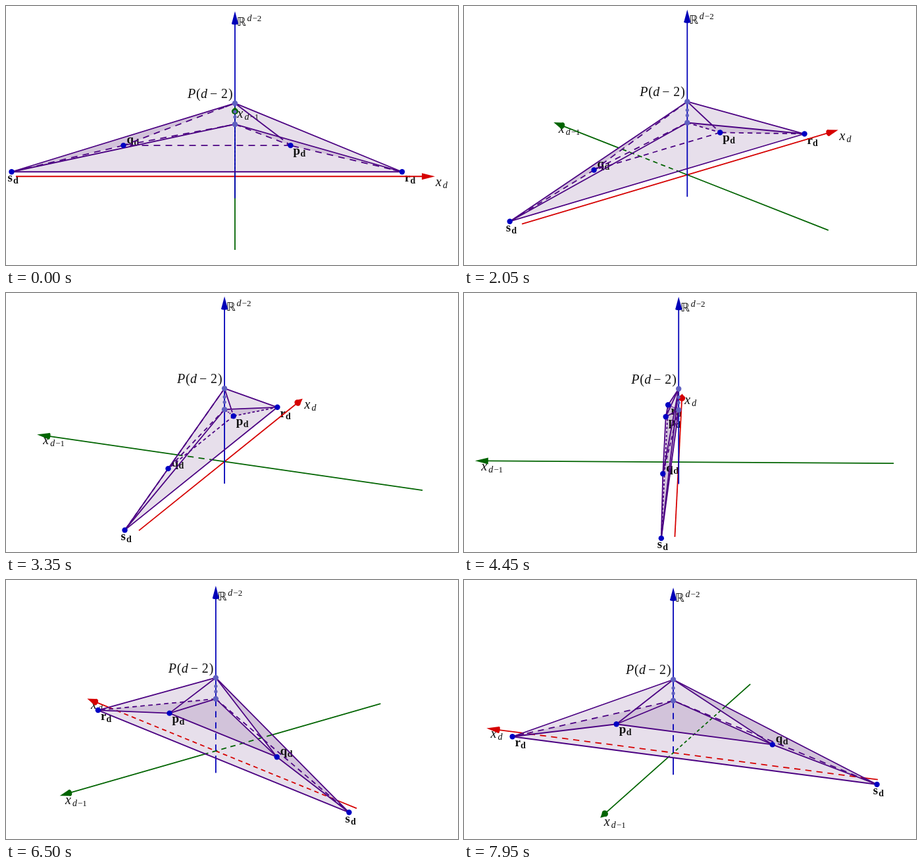
Recreate the animation shown at these times as an HTML page with a canvas. Size 687 by 394 pixels, loop 8000 ms.

```html
<!DOCTYPE html>
<html lang="en">
<head>
<meta charset="utf-8">
<title>Rotating polytope</title>
<style>
  html, body { margin: 0; width: 100%; height: 100%; overflow: hidden; background: #fff; }
  canvas { display: block; }
</style>
</head>
<body>
<canvas id="stage" width="687" height="394"></canvas>
<script>
const ctx = document.getElementById('stage').getContext('2d');
const LOOP = 8000, STEP = 50, DEG = Math.PI / 180;
const SIN_TILT = Math.sin(20 * DEG), COS_TILT = Math.cos(20 * DEG);
const PURPLE = '#4b0082', BLUE = '#0000c3', INK = '#111';
const SERIF = '"Liberation Serif", "Noto Serif", serif';

// World coordinates: x along x_d, y along x_(d-1), z up.
const V = {
  A: [0, 0, 118.5], B: [0, 0, 84.4],
  s: [-339.5, 20.5, 0], r: [254, 20.5, 0],
  q: [-169.5, 21, 42.5], p: [84.5, 21, 42.5]
};
const FACES = ['Bsr', 'ABs', 'ABp', 'ABq', 'Apr', 'Aqs', 'Bpq'];
const FILLED = ['Bsr', 'ABs', 'ABp', 'Apr', 'Aqs'];
const EDGES = ['sr', 'rp', 'pq', 'qs', 'As', 'Ar', 'Ap', 'Aq', 'Bs', 'Br', 'Bp', 'Bq'];
const AXES = [
  { dir: [1, 0, 0], from: -333, to: 304, color: '#d60000' },
  { dir: [0, 1, 0], from: -327, to: 309.5, color: '#006400' },
  { dir: [0, 0, 1], from: -35.5, to: 267.5, color: '#0000b8' }
];

let sin, cos, faces;

// Screen x, screen y and depth (larger is nearer).
function rotate([x, y, z]) {
  const back = x * sin + y * cos;
  return [x * cos - y * sin, -back * SIN_TILT - z * COS_TILT, z * SIN_TILT - back * COS_TILT];
}

// The turntable's centre lies a little off the origin of the axes.
function project([x, y, z]) {
  const [u, v, depth] = rotate([x + 14, y + 8, z]);
  return [334 + u, 262 + v, depth];
}

const along = (dir, k) => dir.map(c => c * k);
const mix = (a, b, k) => a.map((c, i) => c + (b[i] - c) * k);
const area = (a, b, c) => (b[0] - a[0]) * (c[1] - a[1]) - (b[1] - a[1]) * (c[0] - a[0]);

function isHidden(pt) {
  return faces.some(([a, b, c]) => {
    const whole = area(a, b, c);
    if (Math.abs(whole) < 1) return false;
    const wa = area(pt, b, c) / whole, wb = area(a, pt, c) / whole, wc = 1 - wa - wb;
    return wa > 0 && wb > 0 && wc > 0 && wa * a[2] + wb * b[2] + wc * c[2] > pt[2] + 1;
  });
}

// Hidden stretches are dashed; dashes shorten with perspective of the line.
function drawLine(from, to, color) {
  const a = project(from), b = project(to);
  const length = Math.hypot(b[0] - a[0], b[1] - a[1]);
  const shrink = length / Math.hypot(...from.map((c, i) => to[i] - c));
  const n = Math.max(20, Math.ceil(length / 2));
  const hiddenAt = i => isHidden(mix(a, b, (i + 0.5) / n));
  ctx.strokeStyle = color;
  ctx.lineWidth = 1.8;
  for (let i = 0; i < n;) {
    const start = i, hidden = hiddenAt(i);
    while (i < n && hiddenAt(i) === hidden) i++;
    const p = mix(a, b, start / n), q = mix(a, b, i / n);
    ctx.setLineDash(hidden ? [10 * shrink, 8 * shrink] : []);
    ctx.lineDashOffset = length * start / n;
    ctx.beginPath();
    ctx.moveTo(p[0], p[1]);
    ctx.lineTo(q[0], q[1]);
    ctx.stroke();
  }
  ctx.setLineDash([]);
}

function drawCone({ dir, to, color }) {
  const tip = project(along(dir, to)), base = project(along(dir, to - 20));
  const [dx, dy, depth] = rotate(dir);
  const angle = Math.atan2(dy, dx), R = 5;
  const nx = -Math.sin(angle) * R, ny = Math.cos(angle) * R;
  ctx.fillStyle = color;
  ctx.beginPath();
  ctx.moveTo(tip[0], tip[1]);
  ctx.lineTo(base[0] + nx, base[1] + ny);
  ctx.lineTo(base[0] - nx, base[1] - ny);
  ctx.fill();
  ctx.beginPath();
  ctx.ellipse(base[0], base[1], R * Math.abs(depth), R, angle, 0, 7);
  ctx.fill();
}

function drawDot(pos, radius, color) {
  const [x, y] = project(pos);
  ctx.fillStyle = color;
  ctx.beginPath();
  ctx.arc(x, y, radius, 0, 7);
  ctx.fill();
}

function fillFace([a, b, c]) {
  ctx.beginPath();
  for (const p of [a, b, c]) ctx.lineTo(p[0], p[1]);
  ctx.fill();
}

// Each part: [text, style and size, horizontal offset, vertical offset].
function drawText(pos, dx, dy, parts) {
  const [x, y] = project(pos);
  ctx.fillStyle = INK;
  for (const [text, style, px, py = 0, family = SERIF] of parts) {
    ctx.font = style + ' ' + family;
    ctx.fillText(text, x + dx + px, y + dy + py);
  }
}

function drawLabels() {
  const offsets = { s: [-6, 15], r: [4, 15], p: [4, 14], q: [5, -3] };
  for (const [name, [dx, dy]] of Object.entries(offsets)) {
    const subX = name === 's' || name === 'r' ? 8.5 : 11;
    drawText(V[name], dx, dy, [[name, 'bold 19px', 0], ['d', 'bold 14px', subX, 3]]);
  }
  const x = ['x', 'italic 20px', 0], d = ['d', 'italic 14px', 11, 3];
  drawText([301.3, 0, 0], 3.7, 14.5, [x, d]);
  drawText([0, 303.5, 0], 3.5, 14.5, [x, d, ['−1', '13px', 19, 3]]);
  drawText([0, 0, 267.5], 2.5, 22, [
    ['ℝ', '18px', 0, 0, '"DejaVu Sans", sans-serif'],
    ['d', 'italic 14px', 16, -7], ['−2', '13px', 24, -7]
  ]);
  drawText(V.A, -72, -8, [
    ['P', 'italic 20px', 0], ['(', '20px', 13], ['d', 'italic 20px', 20],
    ['−', '20px', 34], ['2', '20px', 51], [')', '20px', 62]
  ]);
}

function render(time) {
  const theta = Math.floor((time % LOOP) / STEP) * DEG;
  sin = Math.sin(theta);
  cos = Math.cos(theta);
  const triangle = name => [...name].map(k => project(V[k]));
  faces = FACES.map(triangle);

  ctx.fillStyle = '#fff';
  ctx.fillRect(0, 0, 687, 394);

  ctx.fillStyle = 'rgba(75, 15, 105, 0.13)';
  FILLED.map(triangle).forEach(fillFace);
  const inner = triangle('Bpq');
  if (area(...inner) < 0) fillFace(inner);

  drawLabels();
  for (const axis of AXES) {
    drawLine(along(axis.dir, axis.from), along(axis.dir, axis.to - 18), axis.color);
  }
  for (const [a, b] of EDGES) drawLine(V[a], V[b], PURPLE);
  AXES.forEach(drawCone);

  for (const name of 'srqp') drawDot(V[name], 4.2, BLUE);
  for (const name of 'AB') drawDot(V[name], 4.2, '#6060c0');
  for (const z of [104.8, 96.2]) drawDot([0, 0, z], 2.6, '#6060c0');
}

const begin = performance.now();
function tick() {
  render(performance.now() - begin);
  requestAnimationFrame(tick);
}
tick();
</script>
</body>
</html>
```
